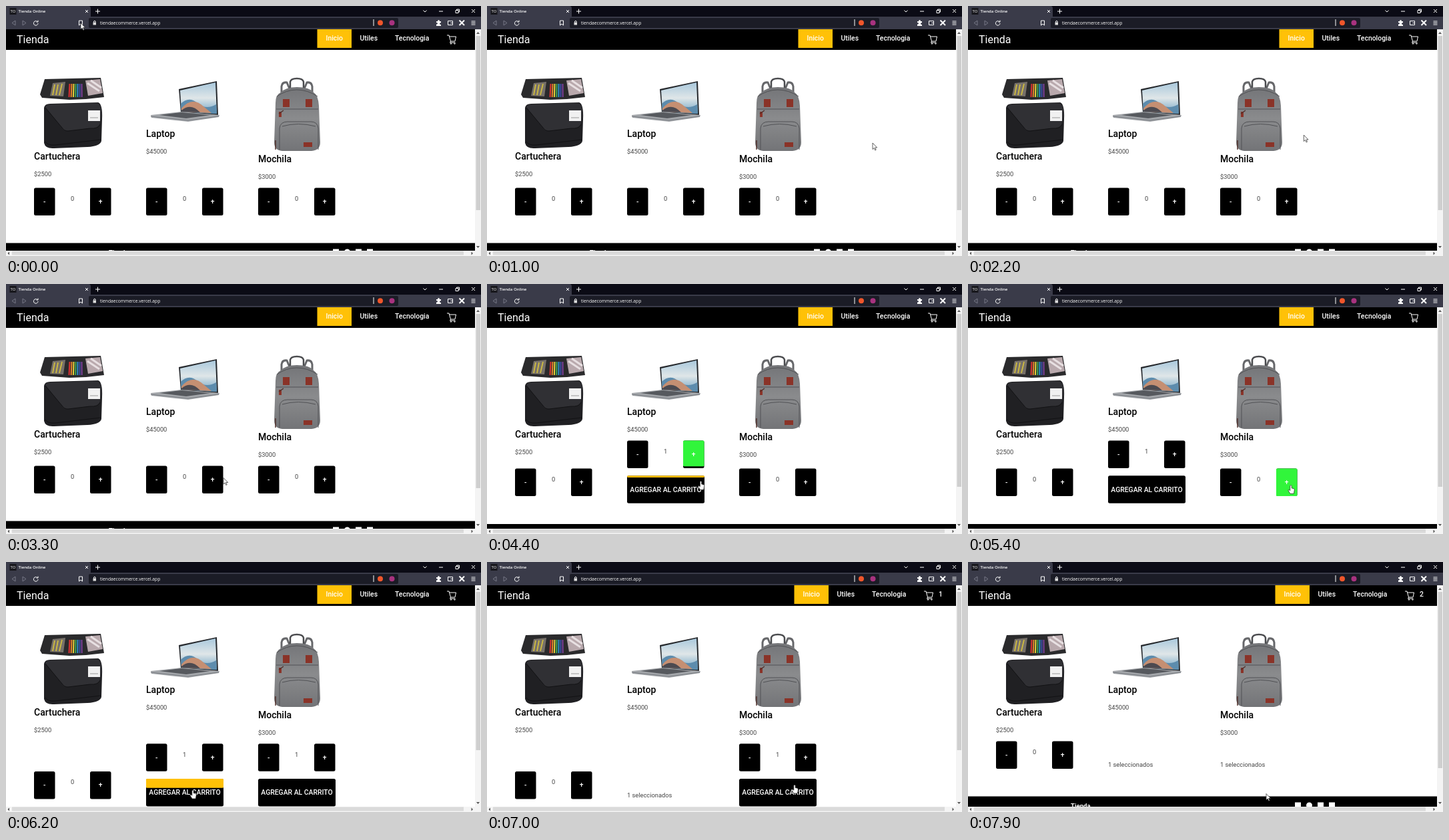
Animation, 712 px wide and 376 px high, one loop 8000 ms. Source, as an HTML page:

```html
<!DOCTYPE html>
<html lang="es">
<head>
<meta charset="utf-8">
<title>Tienda Online</title>
<style>
  html, body { margin: 0; width: 100%; height: 100%; overflow: hidden; background: #fff; }
  svg { display: block; font-family: Roboto, Arial, sans-serif; }
  .ui { font-family: "Open Sans", "Noto Sans", sans-serif; fill: #fff; }
  .line { fill: none; stroke: #fff; stroke-width: 1; }
  .bold { font-weight: 500; }
  .nav { font-size: 10.4px; font-weight: 500; fill: #fff; }
  .title { font-size: 14px; font-weight: 500; }
  .small { font-size: 9.3px; fill: #444; }
  .label { font-size: 10.4px; font-weight: 500; fill: #fff; text-anchor: middle; }
</style>
</head>
<body>
<svg width="712" height="376" viewBox="0 0 712 376">
  <defs>
    <clipPath id="page"><rect y="35" width="703" height="333"/></clipPath>
    <linearGradient id="sky" x2="0" y2="1">
      <stop stop-color="#a9c8dc"/><stop offset=".5" stop-color="#dfe6e8"/><stop offset="1" stop-color="#6fa3c4"/>
    </linearGradient>
    <linearGradient id="cloth" x2="0" y2="1">
      <stop stop-color="#747578"/><stop offset=".5" stop-color="#8a8b8d"/><stop offset="1" stop-color="#737477"/>
    </linearGradient>
  </defs>

  <g clip-path="url(#page)">
    <!-- pencil case -->
    <path d="M58 110L142 108 147 137 120 140 95 141 54 138 51 133Z" fill="#2a2a2c"/>
    <path d="M70 116L89 114 86 136 66 135Z" fill="#77716a"/>
    <path d="M73 118L70 134M78 118L75 134M84 117L80 134" stroke="#d6c23c" stroke-width="1.6"/>
    <g id="pens" stroke-width="2"></g>
    <path d="M119 112L141 110 145 131 123 135Z" fill="#b9a9ad"/>
    <path d="M122 116L140 128M127 112L143 123" stroke="#e8e0e2" stroke-width="3"/>
    <path d="M57 153Q58 147 66 147L138 145Q145 147 144 170L143 203Q141 211 122 212L72 214Q59 215 57 206Z" fill="#202023"/>
    <path d="M59 152Q60 148 68 148L137 146Q144 149 143 166L140 179Q138 185 126 184L92 188Q86 188 83 182Z" fill="#303034"/>
    <path d="M59 153L84 183Q87 188 93 188L126 184Q138 185 141 178M59 204Q62 210 74 209L142 201" fill="none" stroke="#121214"/>
    <rect x="123" y="157" width="18" height="16" fill="#f1f1f1"/>
    <path d="M126 168H138" stroke="#999"/>

    <!-- laptop -->
    <path d="M259 125L316 113 318 164 262 160Z" fill="#26292d"/>
    <path d="M261 127L314 115 316 162 263 159Z" fill="url(#sky)"/>
    <path d="M262 147Q274 135 287 146T315 148L316 162 263 159Z" fill="#5d8cad"/>
    <path d="M263 154Q279 135 296 151L308 161 263 159Z" fill="#c58f72"/>
    <path d="M263 157Q277 145 291 160L263 159Z" fill="#4c4a50"/>
    <path d="M217 164L262 159 320 164 319 167 273 174 218 168Z" fill="#a3a6aa"/>
    <path d="M230 164L263 160 306 164 270 169Z" fill="#56595e"/>
    <path d="M217 166L273 172 319 166" fill="none" stroke="#777b80"/>

    <!-- backpack -->
    <path d="M413 134V121Q414 114 421 115L426 127M459 134V121Q458 114 451 115L446 127" fill="none" stroke="#66676a" stroke-width="3"/>
    <path d="M426 125V114Q427 109 436 109T446 114V125" fill="none" stroke="#4a4b4e" stroke-width="2.5"/>
    <path d="M404 146Q404 133 412 130 419 122 436 122 455 122 461 130 468 134 469 150L471 205Q471 217 458 218H414Q402 217 402 205Z" fill="url(#cloth)"/>
    <path d="M406 136Q420 126 436 126T467 136M405 155H468M410 216V184Q411 174 422 174H457Q467 174 468 184V216M414 181Q438 174 464 181" fill="none" stroke="#505154"/>
    <path d="M415 140h10v12h-10zM449 140h10v12h-10zM446 205h13v7h-13zM409 159h4v8h-4z" fill="#8a3328"/>
    <path d="M404 202V216M409 162L416 157" stroke="#50302b" stroke-width="1.5"/>

    <g id="cards"></g>

    <g id="footer">
      <rect width="703" height="60"/>
      <text x="154" y="17.3" font-size="9.6" font-weight="700" fill="#fff">Tienda</text>
      <path d="M490 9h9v9h-9zM524 9h9v9h-9zM541 9h9v9h-9z" fill="#fff"/>
      <circle cx="511.500" cy="13.500" r="4.500" fill="#fff"/>
    </g>

    <rect y="35" width="703" height="31"/>
    <text x="16" y="55.500" font-size="16" fill="#fff">Tienda</text>
    <g id="menu" class="nav">
      <rect x="466.500" y="35" width="51.500" height="28" fill="#ffc107"/>
      <text x="479.500" y="52.300">Inicio</text>
      <text x="530.500" y="52.300">Utiles</text>
      <text x="583" y="52.300">Tecnologia</text>
      <path class="line" stroke-width=".9" d="M661 44H664L666.500 53H673L674.500 46H665M666.500 53L665.500 55H673.500"/>
      <circle class="line" cx="667" cy="56.500" r=".8"/><circle class="line" cx="672.500" cy="56.500" r=".8"/>
    </g>
    <text id="total" class="nav" x="677" y="52.300"></text>
  </g>

  <!-- scroll bars -->
  <path d="M703 35h9v341H0v-8h703z" fill="#f4f4f4"/>
  <rect id="thumb" x="704.500" y="45" width="6.500" fill="#cfcfcf"/>
  <rect x="9" y="368.500" width="677" height="6" fill="#dadada"/>
  <path d="M705 42l2.500-3 2.500 3zM705 361l2.500 3 2.500-3zM5 369.500l-2.500 2.500 2.500 2.500zM697.500 369.500l2.500 2.500-2.500 2.500z" fill="#555"/>

  <!-- browser frame -->
  <rect width="712" height="35" fill="#0b0b15"/>
  <path d="M0 0H124Q127 0 127 4V16H712V35H0Z" fill="#3a3b49"/>
  <rect x="5.500" y="3" width="10" height="10" fill="#17171c"/>
  <text class="ui" x="6.500" y="10.300" font-size="6">TO</text>
  <text class="ui" x="18.500" y="10.300" font-size="6.100" font-weight="600">Tienda Online</text>
  <path class="line" d="M119 6l4 4m0-4l-4 4M134 8h7M137.500 4.500v7M625.500 6.500l2.500 2.500 2.500-2.500M649 8h6M674 6.500h4v4h-4zM675.500 6.500v-1.500h4v4h-1.500M698 5l5 5m0-5l-5 5"/>
  <path class="line" stroke="#777987" style="stroke:#777987" d="M14 22l-5 3.500 5 3.500zM25 22l5 3.500-5 3.500z"/>
  <path class="line" d="M47 23.500A3.300 3.300 0 1 0 48 26M48 21.500V24H45.500M109.500 22h5v7l-2.500-2-2.500 2z"/>
  <rect x="124" y="18" width="464" height="15" rx="2" fill="#1b1c26"/>
  <path d="M130.500 24.500h4.500v4h-4.500z" fill="#ddd"/>
  <path class="line" stroke-width=".8" d="M131.500 24.500v-1.500q1.300-1.600 2.600 0v1.500M551 20v10"/>
  <text class="ui" x="141" y="27.700" font-size="6.700">tiendaecommerce.vercel.app</text>
  <circle cx="561" cy="25.300" r="4" fill="#f0562b"/>
  <circle cx="578.500" cy="25.300" r="4" fill="#a8327f"/>
  <path d="M645 23h2q0-2 1.500-2t1.500 2h2v2q-2 0-2 1.500t2 1.500v2h-7v-2.500q2 0 2-1.300t-2-1.200z" fill="#fff"/>
  <path class="line" d="M662.500 22.500h7v6h-7zM666.500 25.500h3"/>
  <path class="line" stroke-width="2" style="stroke-width:2" d="M679.500 21.500l7.500 7.500M687 21.500l-7.500 7.500"/>
  <path class="line" d="M697.500 23h6M697.500 25.500h6M697.500 28h6"/>

  <g id="cursor" fill="#fff" stroke="#222" stroke-width=".7" stroke-linejoin="round">
    <path id="arrow" d="M0 0V9.500L2.200 7.500 3.800 11 5.200 10.300 3.700 7H6.700Z"/>
    <path id="hand" d="M-1.200 1Q0-.8 1.200 1V4.500L4.300 5.200Q5.500 5.600 5.300 7.500L4.300 13H-1L-3.800 8.500Q-4.200 6.500-2.700 7L-1.200 8.200Z"/>
  </g>
</svg>
<script>
const $ = id => document.getElementById(id);
const clamp = v => Math.max(0, Math.min(1, v));
const show = (el, on) => el.style.display = on ? '' : 'none';
const BTN = 41.5, LOOP = 8000, STEP = 100;

$('pens').innerHTML = ['#d33', '#e8852a', '#e6d23a', '#3fa34d', '#2c8fc9', '#3a4ea8', '#7b3f98']
  .map((c, i) => `<path d="M${95.5 + i * 3} 117L${94.5 + i * 3.2} 137" stroke="${c}"/>`).join('');

const button = (x, y, w, text, id, color) => `
  <rect x="${x}" y="${y}" width="${w}" height="${BTN}" rx="2.5"/>
  ${id ? `<rect id="${id}" x="${x}" y="${y}" width="${w}" rx="1.5" fill="${color}"/>` : ''}
  <text class="label" x="${x + w / 2}" y="${y + 24.3}">${text}</text>`;

$('cards').innerHTML = [['Cartuchera', 2500, 231], ['Laptop', 45000, 197], ['Mochila', 3000, 235]]
  .map(([name, price, y], i) => `<g transform="translate(${42 + i * 168})">
    <text class="title" y="${y}">${name}</text>
    <text class="small" y="${y + 25}">$${price}</text>
    <g id="qty${i}">
      ${button(0, 0, 31.5, '-')}
      <text id="num${i}" class="small" x="57.5" y="19.3" text-anchor="middle"></text>
      ${button(84, 0, 31.5, '+', 'plus' + i, '#31f53b')}
      <g id="buy${i}">${button(0, 52.7, 116, 'AGREGAR AL CARRITO', 'add' + i, '#ffc107')}</g>
    </g>
    <text id="sel${i}" class="small">1 seleccionados</text>
  </g>`).join('');

// qty: top of each quantity row; a missing row shows the selection text at sel
const states = [
  { from: 0, qty: [273.5, 273.5, 273.5], num: [0, 0, 0], foot: 356.5, thumb: 307 },
  { from: 4400, qty: [277.5, 235.5, 277.5], num: [0, 1, 0], foot: 361, thumb: 305 },
  { from: 5600, qty: [315, 273.3, 273.3], num: [0, 1, 1], foot: 399, thumb: 283 },
  { from: 6500, qty: [315, null, 273.3], num: [0, 1, 1], foot: 399, thumb: 283, sel: 353.6, total: 1 },
  { from: 7800, qty: [269.5, null, null], num: [0, 1, 1], foot: 352.5, thumb: 310, sel: 308, total: 2 }
];

const hovers = [
  ['plus1', 3600, 4380], ['add1', 4380, 4800], ['plus2', 5100, 5800],
  ['add1', 6100, 6500], ['add2', 7000, 7800]
];

// time, x, y
const path = [
  [0, 112, 25.5], [100, 105, 40], [300, 46, 130], [500, 150, 212], [700, 400, 200], [900, 611, 165],
  [1000, 578, 206], [1100, 510, 120], [1200, 470, 82], [1300, 470, 82], [1500, 215, 160],
  [1750, 675, 200], [1900, 570, 222], [2000, 570, 222], [2300, 470, 180], [2600, 500, 106],
  [2900, 512, 122], [3100, 430, 230], [3300, 326, 291.5], [3500, 331, 300], [3600, 316, 300],
  [3700, 320.5, 296.5], [4600, 320.5, 296.5], [5100, 468, 296], [5200, 484, 302.5],
  [5600, 484, 302.5], [6200, 280, 343], [6500, 280, 343], [6900, 432, 316], [7000, 461, 335],
  [7300, 444, 343], [7500, 447, 348.5], [LOOP, 447, 348.5]
];

function cursorAt(t) {
  const i = path.findIndex(p => p[0] > t);
  const [a, b] = [path[i - 1], path[i]];
  const k = (t - a[0]) / (b[0] - a[0]);
  return [a[1] + (b[1] - a[1]) * k, a[2] + (b[2] - a[2]) * k];
}

function draw(t) {
  const s = states.findLast(s => t >= s.from);
  s.qty.forEach((y, i) => {
    const open = y !== null;
    show($('qty' + i), open);
    show($('sel' + i), !open);
    if (open) $('qty' + i).setAttribute('transform', `translate(0 ${y})`);
    else $('sel' + i).setAttribute('y', s.sel);
    $('num' + i).textContent = s.num[i];
    show($('buy' + i), s.num[i] > 0);
    for (const kind of ['plus', 'add']) {
      const fill = hovers.filter(h => h[0] === kind + i)
        .reduce((sum, [, on, off]) => sum + clamp((t - on) / 300) - clamp((t - off) / 300), 0);
      $(kind + i).setAttribute('height', BTN * clamp(fill));
    }
  });
  $('footer').setAttribute('transform', `translate(0 ${s.foot})`);
  $('thumb').setAttribute('height', s.thumb - 45);
  $('menu').setAttribute('transform', `translate(${s.total ? -6 : 0})`);
  $('total').textContent = s.total || '';

  const over = hovers.some(([, on, off]) => t >= on && t < off);
  show($('hand'), over);
  show($('arrow'), !over);
  $('cursor').setAttribute('transform', `translate(${cursorAt(t)})`);
}

function tick() {
  draw(Math.floor(performance.now() % LOOP / STEP) * STEP);
  requestAnimationFrame(tick);
}
tick();
</script>
</body>
</html>
```
